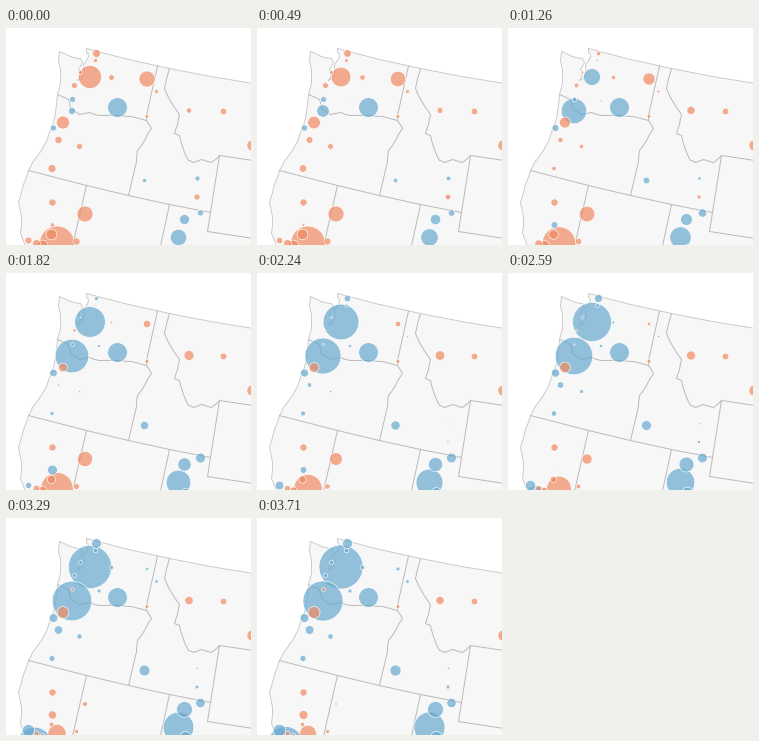
A matplotlib script for the animation above (3780 ms loop, 245 by 217 pixels).

```python
import numpy as np
import matplotlib.pyplot as plt
from matplotlib.animation import FuncAnimation
from matplotlib.colors import to_rgba
from matplotlib.patches import Circle, Polygon

W, H, DPI = 245, 217, 64
FRAMES, STEP_MS = 54, 70
PX = 72 / DPI  # one pixel in points

LAND, COAST, BORDER = "#f7f7f7", "#c8c8c8", "#bbbbbb"
GAIN = to_rgba("#67a9cf", 0.7)
LOSS = to_rgba("#ef8a62", 0.7)

fig = plt.figure(figsize=(W / DPI, H / DPI), dpi=DPI, facecolor="white")
ax = fig.add_axes([0, 0, 1, 1])
ax.set_xlim(-0.5, W - 0.5)  # whole numbers fall on pixel centres
ax.set_ylim(H - 0.5, -0.5)
ax.axis("off")

rng = np.random.default_rng(4)


def rough(points, amount=0.5):
    """Add a slightly displaced midpoint to every segment."""
    pts = np.array(points, float)
    mids = (pts[:-1] + pts[1:]) / 2 + rng.uniform(-amount, amount, (len(pts) - 1, 2))
    out = np.empty((2 * len(pts) - 1, 2))
    out[::2], out[1::2] = pts, mids
    return out


def border(points):
    xs, ys = np.transpose(points)
    ax.plot(xs, ys, color=BORDER, lw=PX, solid_joinstyle="round", zorder=2)


# Land: northern border, off-stage edge, then the coast from south to north
north = [(80, 20), (120, 30.5), (163, 40), (204, 48), (250, 55.5), (250, 222)]
coast = [(20, 222), (14, 205), (15, 189), (12, 174), (17, 156), (22, 142),
         (26, 134), (32, 126), (37, 118), (42, 107), (46, 97), (49, 84),
         (51, 66), (54, 55), (54, 41), (52, 32), (53, 23), (64, 28), (74, 30)]
sound = [(76, 34), (72, 41), (74, 45), (71, 52), (75, 50), (78, 42),
         (77, 36), (82, 28), (80, 24)]
land = np.vstack([north, rough(coast), rough(sound, 1)])
ax.add_patch(Polygon(land, closed=True, fc=LAND, ec=COAST, lw=0.9 * PX,
                     joinstyle="round", zorder=1))

# Rivers and ridges
border(rough([(51, 66), (62, 71), (64, 80), (73, 86), (83, 84), (93, 87),
              (114, 87), (125, 88), (140, 92)]))
border(rough([(140, 92), (145, 100), (138, 112), (131, 122), (130, 133)]))
border(rough([(163, 40), (158, 60), (162, 69), (173, 86), (171, 96),
              (168, 105), (173, 107), (177, 121), (182, 132), (187, 134),
              (195, 131), (205, 134), (213, 127)]))

# Surveyed lines
border([(151, 37.5), (140, 87), (140, 92)])
border([(130, 133), (122, 167)])
border([(22, 142), (80, 157), (122, 167), (163, 176), (204, 184)])
border([(80, 157), (65, 222)])
border([(163, 176), (153, 222)])
border([(250, 132.5), (213, 127), (201, 203), (250, 210.5)])

# All bubbles share one slow-fast-slow clock
t = np.linspace(0, 1, FRAMES)
clock = t * t * (3 - 2 * t)
bubbles = []


def bubble(x, y, *radii):
    """Evenly spaced key radii; the sign picks the colour, the area is eased."""
    r = np.array(radii, float)
    area = np.interp(clock, np.linspace(0, 1, len(r)), r * abs(r))
    patch = Circle((x, y), ec="white", lw=0.6 * PX, zorder=4 - abs(r).max() / 30)
    ax.add_patch(patch)
    bubbles.append((patch, area))


# Washington
bubble(90, 25, -4, 5)
bubble(89, 32, -2, 2.3)
bubble(83.5, 48.5, -11.5, 15.7, 22)
bubble(74, 44, -2, 2)
bubble(68, 57, -3, 2)
bubble(105, 49, -2.8, 2.2)
bubble(140.5, 50.5, -8, -3.5, 2)
bubble(150, 63, -2, 1.8)
bubble(92.5, 72.5, 0, 2)

# Oregon
bubble(66, 71, 3, -1.8)
bubble(65.5, 82.5, 3.5, 17, 20)
bubble(111, 79, 9.8)
bubble(56.5, 94, -6.5, -4.4, -6)
bubble(47, 99.5, 3, 4.4)
bubble(52, 111.5, -3.6, -1, 4.4)
bubble(73, 118, -3, 2.7)
bubble(45.5, 140, -4, 2.2, 3)

# Idaho and Montana
bubble(140.5, 88, -1.9)
bubble(182.5, 82, -2.7, -5, -4.1)
bubble(217, 83, -3.3)
bubble(246, 117, -5.6)
bubble(138, 152, 2, 5.5)
bubble(191, 150, 2.5, 0, 1.2)
bubble(190.5, 168.5, -3, 0, 2)

# Utah
bubble(194, 184.5, 3, 5, 4.7)
bubble(178, 191, 5, 8)
bubble(172, 209, 8.2, 12.4, 15.5)
bubble(179, 219, 0, 6)

# California and Nevada
bubble(46, 174, -3.6)
bubble(78.5, 185.5, -8, -7.6, -1.2)
bubble(46, 196.5, -2.2, 5, -4.5)
bubble(45, 206, -5.4, -2.2)
bubble(50.5, 215, -17.5, -16, -8.3)
bubble(70, 213, -3.6, -2)
bubble(22, 212, -3.5, 3.2, 6.2)
bubble(30, 215, -4, -2.4)
bubble(36, 217, -5.5, -2)
bubble(28, 226, -10, 2, 18)


def draw(i):
    for patch, area in bubbles:
        patch.set_radius(np.sqrt(abs(area[i])))
        patch.set_facecolor(GAIN if area[i] > 0 else LOSS)
        patch.set_visible(abs(area[i]) > 0.1)
    return [patch for patch, _ in bubbles]


anim = FuncAnimation(fig, draw, frames=FRAMES, interval=STEP_MS,
                     repeat=True, repeat_delay=0, blit=False)
plt.show()
```
